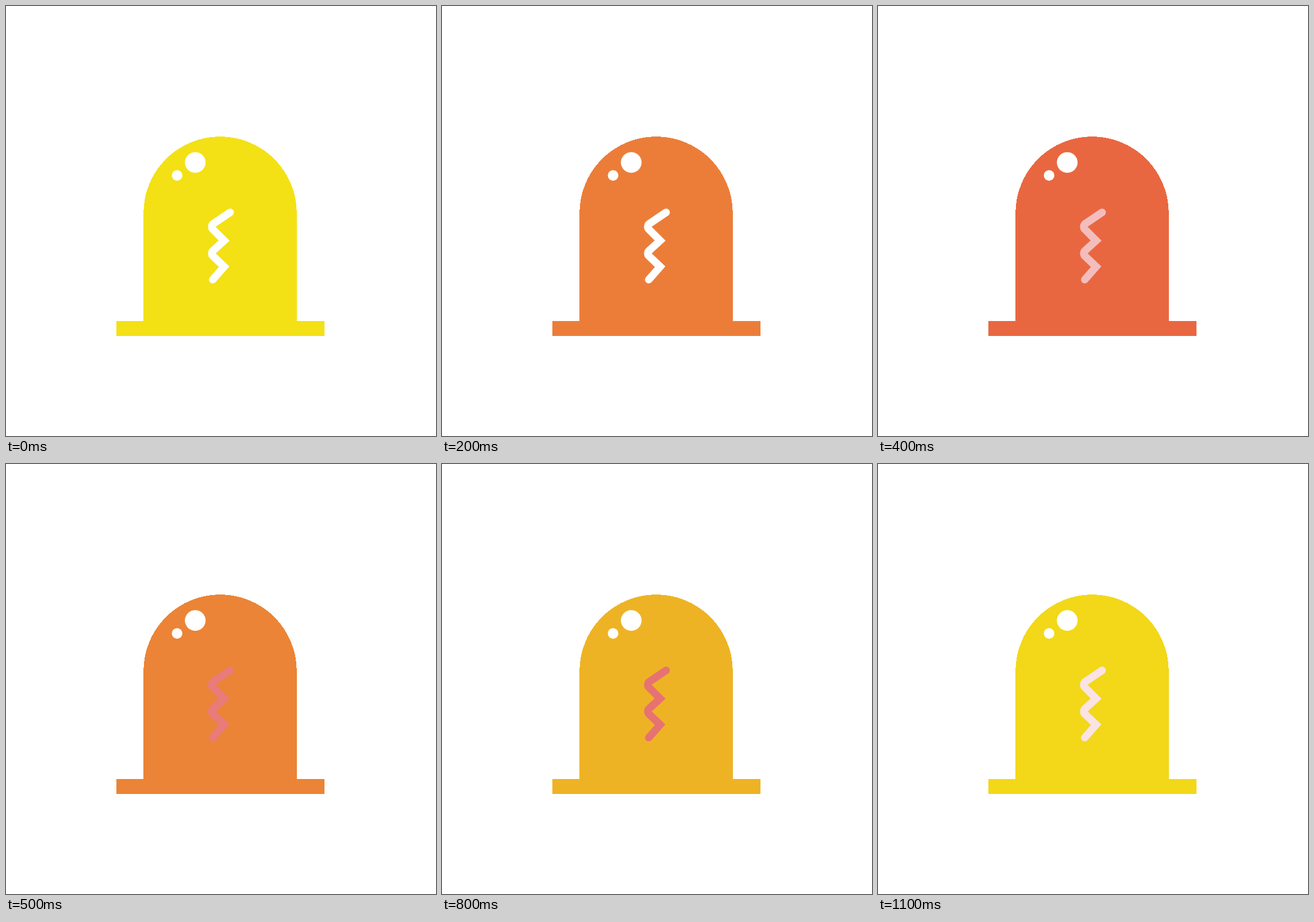
These frames come from a looping animation (748x748 px, 1.2 s). An HTML page:

```html
<!DOCTYPE html>
<html lang="en">
<head>
<meta charset="utf-8">
<title>Pulsing dome</title>
<style>
  html, body { margin: 0; width: 100%; height: 100%; overflow: hidden; background: #fff; }
  svg { display: block; width: 100%; height: 100%; }
</style>
</head>
<body>
<svg viewBox="0 0 748 748">
  <g id="dome" shape-rendering="crispEdges">
    <path d="M239.2 560V360.4a133.3 133.3 0 0 1 266.6 0V560Z"/>
    <rect x="192" y="547.7" width="361.6" height="26.3"/>
  </g>
  <g fill="#fff">
    <circle cx="329.2" cy="272.2" r="18"/>
    <circle cx="297.6" cy="294.7" r="9.2"/>
  </g>
  <path id="bolt" fill="none" stroke-width="13.2" stroke-linecap="round"
    d="M389.8 359L361 378.5a6.5 6.5 0 0 0 -1 10.1L379.4 408L360.2 425.6a6.5 6.5 0 0 0 0 9.6L379.4 453.5L359.7 476"/>
</svg>
<script>
const STEP = 100, STEPS = 12;
const white = [255, 255, 255], yellow = [243, 225, 21], orange = [236, 160, 43];
const red = [232, 75, 75], crimson = [222, 57, 57];

const clamp = k => Math.min(1, Math.max(0, k));
const mix = (a, b, k) => a.map((v, i) => v + (b[i] - v) * clamp(k));
const css = rgb => `rgb(${rgb.map(Math.round)})`;

const dome = document.getElementById('dome');
const bolt = document.getElementById('bolt');
const start = performance.now();

function draw() {
  const step = Math.floor((performance.now() - start) / STEP) % STEPS;
  const flash = step / 3;
  const fade = (step - 3) / 3;
  // The return moves at double speed for its first two steps.
  const back = Math.min(2 * (step - 7), step - 5) / 7;

  const body = mix(mix(yellow, red, flash), orange, fade);
  dome.setAttribute('fill', css(mix(body, yellow, back)));
  bolt.setAttribute('stroke', css(mix(mix(white, crimson, fade), white, back)));
  requestAnimationFrame(draw);
}
draw();
</script>
</body>
</html>
```
